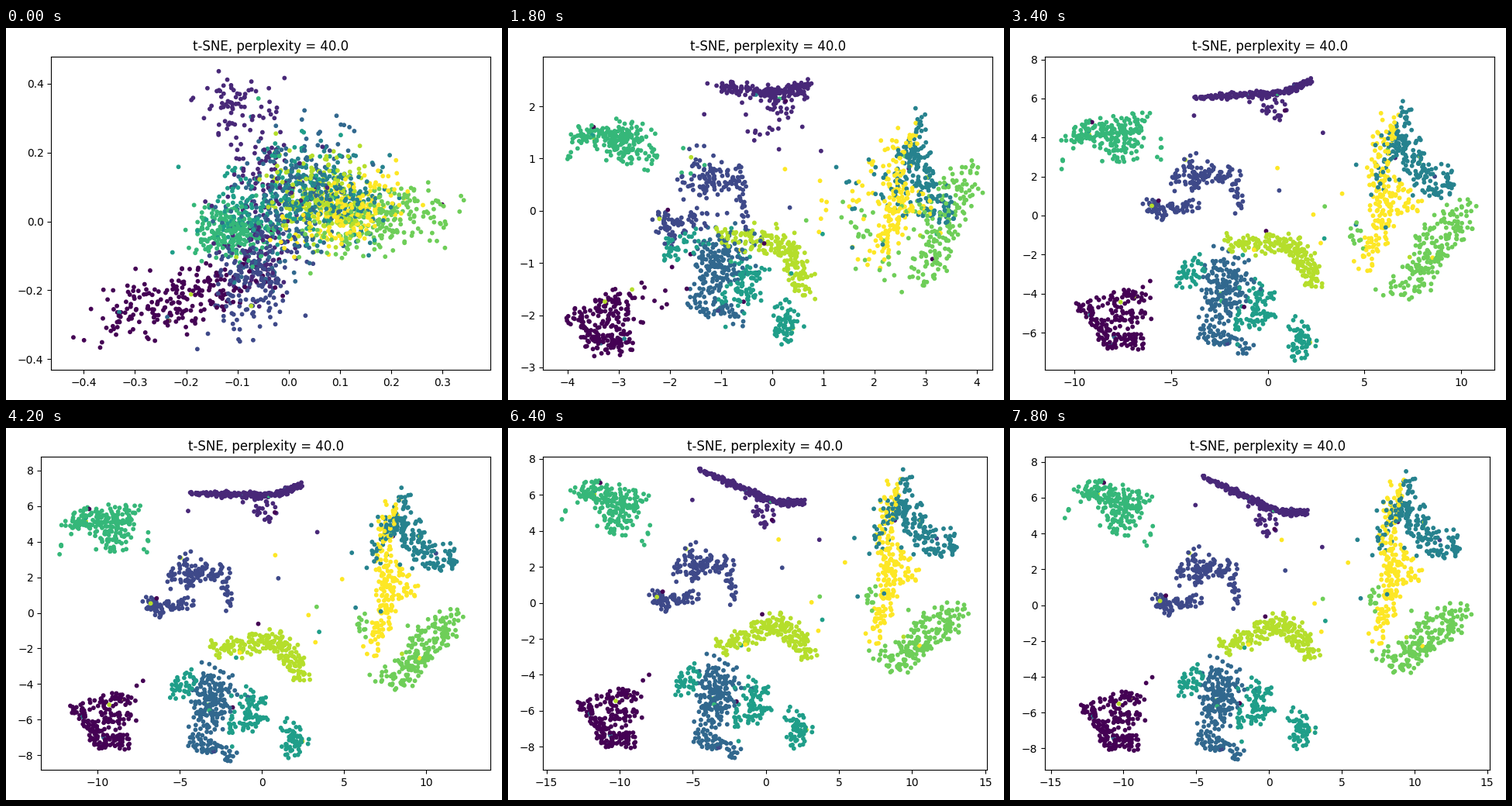
Write a matplotlib script that moves like this. It is 640 px wide and 480 px high and loops after 8 s.

```python
import numpy as np
import matplotlib.pyplot as plt
from matplotlib.animation import FuncAnimation

STEP, FRAMES = 200, 40
rng = np.random.default_rng(11)

# Key times and the axis limits (x0, x1, y0, y1) at each of them
KEYS = np.array([0, 1000, 2600, 4200, 5400, 6400, 7800])
LIMITS = np.array([(-.4638, .3940, -.4312, .4773),
                   (-1.713, 1.638, -1.115, 1.007),
                   (-8.765, 8.495, -6.376, 6.713),
                   (-13.45, 13.91, -8.83, 8.76),
                   (-14.82, 14.93, -9.334, 8.056),
                   (-15.23, 15.13, -9.29, 8.11),
                   (-15.39, 15.19, -9.21, 8.28)])

points, labels = [], []


def gauss(n):
    """Bell-shaped noise that never passes 3."""
    return rng.uniform(-1, 1, (3, n)).sum(axis=0)


def cloud(n, ellipses):
    """Dots dealt in turn to ellipses (x, y, spread x, spread y, correlation)."""
    cx, cy, sx, sy, r = np.resize(ellipses, (n, 5)).T
    g, h = gauss(n), gauss(n)
    return np.stack([cx + sx * g, cy + sy * (r * g + np.sqrt(1 - r * r) * h)], axis=1)


def stroke(n, width, *path):
    """Dots spread evenly along a bent line."""
    s = (np.arange(n) * 0.618034 + rng.random()) % 1
    angle = rng.uniform(0, 2 * np.pi, n)
    radius = 1.2 * width * np.sqrt(rng.random(n)) * (1 + .25 * np.abs(gauss(n)))
    u = np.linspace(0, 1, len(path) // 2)
    return np.stack([np.interp(s, u, path[0::2]) + radius * np.cos(angle),
                     np.interp(s, u, path[1::2]) + radius * np.sin(angle)], axis=1)


def pose(shape, x, y, sx, sy, turn):
    """Turn the centred shape by degrees, stretch it and set it at x, y."""
    a = np.radians(turn)
    px, py = shape.T
    return np.stack([x + sx * (px * np.cos(a) - py * np.sin(a)),
                     y + sy * (px * np.sin(a) + py * np.cos(a))], axis=1)


def cluster(label, centre, ellipses, early, mid, drift, turn, *parts):
    """Parts (n, width, path) give the settled shape; early and mid are poses
    on the way there, drift and turn what still happens afterwards."""
    cx, cy = centre
    shape = np.concatenate([stroke(*p) for p in parts]) - centre
    n = len(shape)
    first = pose(shape, *early) + .035 * np.stack([gauss(n), gauss(n)], axis=1)
    first *= 1 - rng.random((n, 1)) ** 14      # some dots lag in the middle
    near_end = (cx * 1.015, cy + .7 * drift, 1.015, 1, .9 * turn)
    poses = [mid, (cx * .92, cy * .97, .93, .96, .4 * mid[4]), (cx, cy, 1, 1, 0),
             near_end, (cx * 1.02, cy + drift, 1.02, 1, turn)]
    keys = [cloud(n, ellipses), first] + [pose(shape, *p) for p in poses]
    points.append(np.array(keys))
    labels.append(np.full(n, label))


cluster(0, (-10.4, -6.4), [(-.22, -.23, .08, .05, .5)],
        (-1.4, -.88, .09, .11, 15), (-5.8, -4.3, .75, .8, 0), -.2, 0,
        (40, .3, -12.3, -5.4, -11.4, -6.6), (50, .33, -11, -5.2, -8.8, -5),
        (45, .38, -11.2, -6.2, -8.7, -6.2), (85, .38, -11.2, -7, -10.4, -7.5, -8.8, -7.4))
cluster(1, (-.7, 6.9),
        [(-.09, .335, .038, .042, 0), (-.03, .13, .05, .08, -.3), (-.06, -.08, .04, .09, .2)],
        (0, .79, .06, .06, -27), (-.4, 5.25, .65, .7, 12), -1.1, -15,
        (190, .12, -4.6, 7.25, -1.5, 6.9, 1, 6.7, 2.6, 7.15), (30, .45, -.8, 6.3, .6, 5.6))
cluster(2, (-4.8, 1.5), [(-.07, -.16, .04, .085, .3)],
        (-.42, 0, .08, .23, 0), (-2.9, 1.1, .72, .75, 0), -.3, 0,
        (75, .3, -7.4, .6, -6.8, .1, -4.7, .7), (90, .38, -5.1, 3.4, -4.9, 1.7, -4, 2.5, -2.6, 2.3),
        (22, .22, -2.5, 2.1, -2.2, .2), (12, .3, -6.1, 1.7, -5.6, 2.5))
cluster(3, (-3.6, -6), [(0, .06, .06, .1, .35)],
        (-.58, -.4, .13, .08, 0), (-1.7, -3, .75, .8, 0), 0, 0,
        (150, .75, -3.6, -3.9, -3.4, -5.2, -3.9, -6.7), (25, .5, -2.2, -4, -2.4, -5.6),
        (60, .36, -4.7, -7.2, -3.6, -7.8, -1.9, -8.3))
cluster(4, (10, 4.4), [(.08, .08, .06, .065, -.3)],
        (1.24, .22, .05, .15, -12), (5.3, 1.8, .5, .95, 0), .2, 0,
        (65, .4, 9.4, 6.9, 9.1, 5, 8.4, 4.9), (85, .65, 9.6, 5, 10.9, 3.1),
        (38, .3, 11.1, 2.8, 12.6, 2.8, 12.2, 3.8), (24, .5, 8, 5.2, 7.4, 2.6))
cluster(5, (-1, -6), [(-.02, .06, .075, .075, .2)],
        (-.38, -.45, .11, .1, -8), (-.6, -3.6, .62, .9, -10), .2, 0,
        (40, .45, -5.8, -5, -4.9, -4), (85, .55, -1.4, -5, -.3, -5.4, -.8, -6, -2, -6.9),
        (60, .36, 1.6, -7.9, 2.8, -7.2, 1.6, -6.4))
cluster(6, (-10.2, 5.2), [(-.115, -.03, .038, .04, 0)],
        (-1.15, .48, .06, .07, -10), (-6, 3.2, .75, .7, 12), .5, -12,
        (130, .5, -12.6, 5.4, -11, 5.6, -8.3, 5.5), (85, .75, -10.6, 5, -9.4, 4.3),
        (4, .1, -13.5, 3.7, -13.2, 4.3), (5, .2, -8, 3, -7.4, 4.4))
cluster(7, (10.6, -2.2), [(.18, .005, .065, .05, .3)],
        (1.28, 0, .12, .13, 35), (6.5, -1.2, .85, .9, 30), .3, 0,
        (185, .75, 13, -.9, 11.3, -1.7, 10, -2.5, 8.8, -3.5), (12, .35, 7.3, -2.8, 8.4, -3.4),
        (12, .4, 6.8, .8, 7.1, -.6))
cluster(8, (0, -2.1), [(.06, .07, .05, .06, -.1)],
        (-.15, -.3, .12, .12, -30), (.6, -1.4, .65, .65, -30), .4, 0,
        (205, .45, -3.1, -2.6, -1, -2.1, .8, -1.3, 1.9, -2.1, 2.8, -3.2))
cluster(9, (8.3, 2.3), [(.11, .03, .055, .05, .5)],
        (1.12, .17, .09, .085, -12), (4, .8, .85, .72, 0), .4, 0,
        (165, .45, 8.6, 6.3, 8, 4, 8.3, 1.5, 8.2, 0, 7.4, -2.1), (40, .6, 8.7, 2.3, 9.7, 1.2))

points, labels = np.concatenate(points, axis=1), np.concatenate(labels)

# A few dots sit between two clusters, a few inside the wrong one
a, b = rng.integers(0, len(labels), (2, 24))
mix = rng.uniform(.15, .5, (24, 1))
points[:, a] += mix * (points[:, b] - points[:, a])
odd = rng.random(len(labels)) < .02
labels[odd] = rng.integers(0, 10, odd.sum())

order = rng.permutation(len(labels))
points, labels = points[:, order], labels[order]

# Fractions of the axes box, so that dots and limits grow together
low = LIMITS[:, None, 0::2]
points = (points - low) / (LIMITS[:, None, 1::2] - low)


def slopes(v):
    """Monotone slopes at the key times."""
    d = np.diff(v, axis=0) / np.diff(KEYS).reshape((-1,) + (1,) * (v.ndim - 1))
    a, b = d[:-1], d[1:]
    same = a * b > 0
    inner = np.where(same, 2 * a * b / np.where(same, a + b, 1), 0)
    return np.concatenate([d[:1], inner, d[-1:]])


def ease(v, m, t):
    k = min(np.searchsorted(KEYS, t, side="right") - 1, len(KEYS) - 2)
    h = KEYS[k + 1] - KEYS[k]
    u = (t - KEYS[k]) / h
    return ((1 + 2 * u) * (1 - u) ** 2 * v[k] + u * (1 - u) ** 2 * h * m[k]
            + u * u * (3 - 2 * u) * v[k + 1] - u * u * (1 - u) * h * m[k + 1])


signs, log_limits = np.sign(LIMITS[0]), np.log(np.abs(LIMITS))
limit_slopes, point_slopes = slopes(log_limits), slopes(points)

fig, ax = plt.subplots(figsize=(6.4, 4.8), dpi=100)
dots = ax.scatter(*points[0].T, s=10, c=labels, cmap="viridis",
                  vmin=0, vmax=9, linewidths=1)
ax.set_title("t-SNE, perplexity = 40.0")


def draw(i):
    t = i * STEP
    x0, x1, y0, y1 = signs * np.exp(ease(log_limits, limit_slopes, t))
    frac = ease(points, point_slopes, t)
    dots.set_offsets(np.array([x0, y0]) + frac * np.array([x1 - x0, y1 - y0]))
    ax.set_xlim(x0, x1)
    ax.set_ylim(y0, y1)
    fig.subplots_adjust(left=.125, right=.9, bottom=.11, top=.88)
    fig.tight_layout()
    return dots,


anim = FuncAnimation(fig, draw, frames=FRAMES, interval=STEP, repeat=True,
                     repeat_delay=0, blit=False)
plt.show()
```
